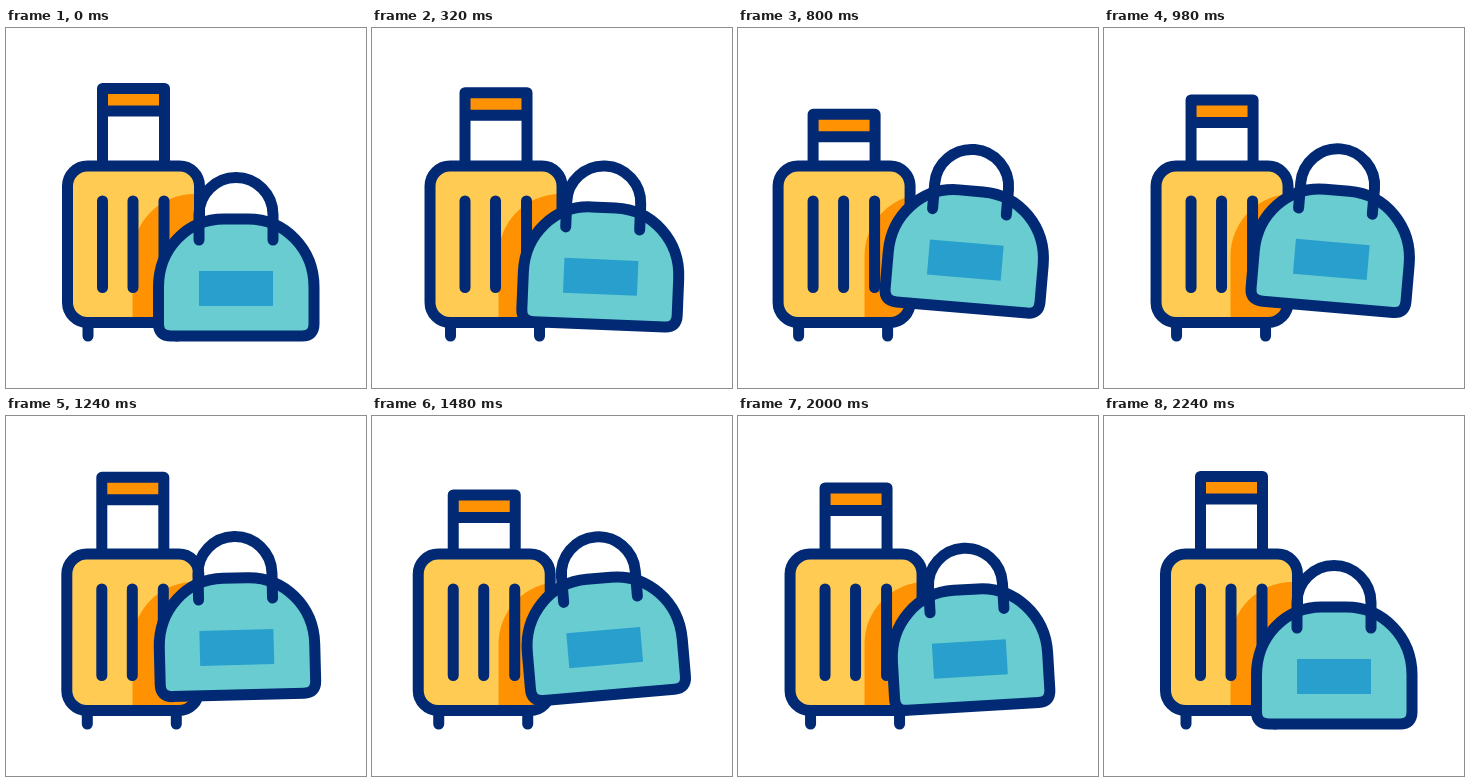
Animation, 360 px wide and 360 px high, one loop 2.42 s. Source, as an HTML page:

```html
<!DOCTYPE html>
<html lang="en">
<head>
<meta charset="utf-8">
<title>Luggage</title>
<style>
  html, body { margin: 0; width: 100%; height: 100%; overflow: hidden; background: #fff; }
  svg { display: block; width: 100vw; height: 100vh; }
  .line { fill: none; stroke: #022a74; stroke-width: 11; stroke-linecap: round; stroke-linejoin: round; }
</style>
</head>
<body>
<svg viewBox="0 0 360 360">
  <defs>
    <clipPath id="shell"><rect id="shellBox" x="61.5" y="138" width="132" height="156.5" rx="20"/></clipPath>
  </defs>

  <g id="pull">
    <path d="M96.5 60.5H158.5V83H96.5Z" fill="#ff9202"/>
    <path class="line" d="M96.5 138V60.5H158.5V138M96.5 83H158.5"/>
  </g>

  <!-- Keeps the pull's posts hidden behind the case -->
  <g clip-path="url(#shell)">
    <rect width="360" height="360" fill="#ffcb52"/>
    <path d="M126.5 300V228A61.5 62 0 0 1 188 166H210V300Z" fill="#ff9202"/>
  </g>
  <g id="frame" class="line">
    <rect x="61.5" y="138" width="132" height="156.5" rx="20"/>
    <path d="M96.5 173V259.500M127 173V259.500M158 173V259.500M82 296V308M171 296V308"/>
  </g>

  <g id="bag">
    <path class="line" style="fill:#68ccd1"
      d="M165 308Q152.500 308 152.500 296V259C152.500 221 181 191 218 191H242C279 191 308 221 308 259V296Q308 308 296 308Z"/>
    <rect x="193" y="243" width="74" height="35" fill="#289fcc"/>
    <path class="line" d="M193 212V186.500A37 37 0 0 1 267 186.500V212"/>
  </g>
</svg>
<script>
  const LOOP = 2420, STEP = 20;
  const SLIDE = 24, DROP = 29, LIFT = 29, TILT = 4.9;
  const get = id => document.getElementById(id);
  const [pull, frame, bag, shellBox] = ['pull', 'frame', 'bag', 'shellBox'].map(get);

  const clamp = x => Math.min(1, Math.max(0, x));
  const smooth = x => x * x * (3 - 2 * x);
  const easeOut = x => 1 - (1 - x) ** 4;

  // [time, value] pairs: the case slides out and back twice
  const caseKeys = [[200, 0], [700, 1], [1190, 0], [1680, 1], [2240, 0]];

  function tween(keys, t) {
    let value = keys[0][1];
    for (let i = 1; i < keys.length; i++) {
      const [t0, a] = keys[i - 1], [t1, b] = keys[i];
      if (t >= t0) value = a + (b - a) * smooth(clamp((t - t0) / (t1 - t0)));
    }
    return value;
  }

  // Fast rise, long hang, mirrored fall
  const hop = (t, rise) => easeOut(clamp(Math.min(t - 200, 2205 - t) / rise));

  function draw(now) {
    const t = Math.floor(now % LOOP / STEP) * STEP;
    const out = tween(caseKeys, t);
    const dx = -SLIDE * out;
    pull.setAttribute('transform', `translate(${dx} ${DROP * out})`);
    frame.setAttribute('transform', `translate(${dx} 0)`);
    shellBox.setAttribute('x', 61.5 + dx);

    const swing = 1 - 2 * smooth(clamp((t - 1000) / 400));
    const angle = TILT * hop(t, 800) * swing;
    bag.setAttribute('transform', `translate(0 ${-LIFT * hop(t, 1000)}) rotate(${angle} 230 229)`);
  }

  const start = performance.now();
  function tick() {
    draw(performance.now() - start);
    requestAnimationFrame(tick);
  }
  tick();
</script>
</body>
</html>
```
